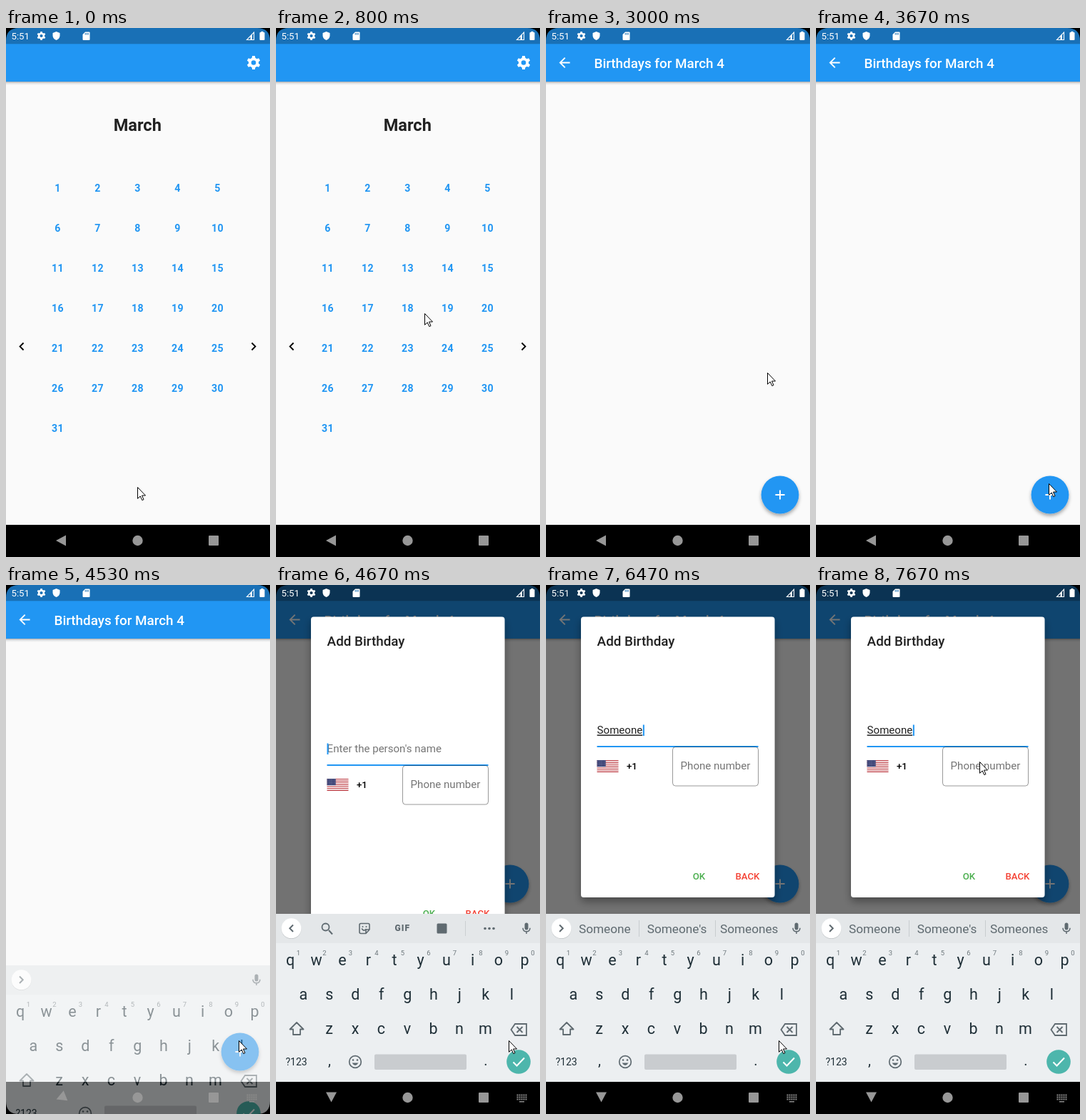
Recreate the animation shown at these times as an HTML page. Size 370 by 740 pixels, loop 8000 ms.

```html
<!DOCTYPE html>
<html lang="en">
<head>
<meta charset="utf-8">
<title>Birthday calendar</title>
<style>
html, body { margin: 0; width: 370px; height: 740px; overflow: hidden; background: #000; }
svg { display: block; font-family: Roboto, sans-serif; }
.mid { text-anchor: middle; }
</style>
</head>
<body>
<svg id="stage" width="370" height="740" viewBox="0 0 370 740" xmlns="http://www.w3.org/2000/svg"></svg>
<script>
const LOOP = 8000, FPS = 15;
const BLUE = '#2196f3', INK = '#1f2f37', GREY = '#5f6a70';

const text = (s, x, y, size, fill, weight = 400, extra = '') =>
  `<text x="${x}" y="${y}" font-size="${size}" fill="${fill}" font-weight="${weight}" ${extra}>${s}</text>`;
const mid = (s, x, y, size, fill, weight, extra = '') =>
  text(s, x, y, size, fill, weight, 'class="mid" ' + extra);
const rect = (x, y, w, h, fill, extra = '') =>
  `<rect x="${x}" y="${y}" width="${w}" height="${h}" fill="${fill}" ${extra}/>`;
const circle = (x, y, r, fill, extra = '') =>
  `<circle cx="${x}" cy="${y}" r="${r}" fill="${fill}" ${extra}/>`;
const path = (d, fill, extra = '') => `<path d="${d}" fill="${fill}" ${extra}/>`;
const line = (d, color, w, extra = '') =>
  path(d, 'none', `stroke="${color}" stroke-width="${w}" ${extra}`);
const group = (id, body, extra = '') => `<g id="${id}" ${extra}>${body}</g>`;
// Icons are drawn on a 24-unit square centred on x, y
const icon = (x, y, size, body) =>
  `<g transform="translate(${x - size / 2} ${y - size / 2}) scale(${size / 24})">${body}</g>`;
const range = n => [...Array(n).keys()];

const gear = circle(12, 12, 5.5, 'none', 'stroke="#fff" stroke-width="4"') +
  range(6).map(i => path('M9.3 6L10 2H14L14.7 6Z', '#fff', `transform="rotate(${i * 60} 12 12)"`)).join('');
const chevron = 'M8.59 16.59L13.17 12 8.59 7.41 10 6l6 6-6 6z';
const chevronLeft = 'M15.41 16.59L10.83 12l4.58-4.59L14 6l-6 6 6 6z';
const plus = 'M19 13h-6v6h-2v-6H5v-2h6V5h2v6h6z';
const arrowBack = 'M20 11H7.83l5.59-5.59L12 4l-8 8 8 8 1.41-1.41L7.83 13H20z';

function calendar() {
  const days = range(31).map(i =>
    mid(i + 1, 72.5 + i % 5 * 56, 229.2 + Math.floor(i / 5) * 56, 14.1, BLUE, 700, 'letter-spacing=".3"'));
  return icon(347, 48.5, 22.6, gear) +
    mid('March', 184.3, 144, 23.55, '#212121', 700) + days.join('') +
    icon(22, 445.5, 22.6, path(chevronLeft, '#000')) +
    icon(347, 445.5, 22.6, path(chevron, '#000'));
}

function dayPage() {
  const fab = circle(328, 653, 26.4, BLUE, 'filter="url(#lift)"') +
    icon(328, 653, 22.6, path(plus, '#fff'));
  return icon(26, 48.5, 22.6, path(arrowBack, '#fff')) +
    text('Birthdays for March 4', 67.5, 55.6, 18.85, '#fff', 500) + group('fab', fab);
}

function flag() {
  const stripes = range(13).map(i =>
    rect(71.5, 245 + i * 17 / 13, 30, 17 / 13, i % 2 ? '#fff' : '#bd3d44')).join('');
  const stars = range(20).map(i =>
    circle(73 + i % 5 * 2.3, 246.3 + Math.floor(i / 5) * 2.1, .45, '#fff')).join('');
  return stripes + rect(71.5, 245, 12.2, 9.15, '#343b70') + stars;
}

function dialog() {
  const field = text("Enter the person's name", 71.6, 208.4, 15.07, '#757575', 400, 'id="hint"') +
    text('', 71.6, 208.4, 15.07, '#212121', 400, 'id="typed" text-decoration="underline"') +
    rect(71.5, 225, 226, 2, BLUE) +
    rect(71.5, 195.5, 2, 15.5, BLUE, 'id="caret"');
  const phone = flag() + text('+1', 113, 258, 13.2, '#000', 500) +
    rect(177.5, 226.5, 120, 54.5, 'none', 'rx="4" stroke="#000" stroke-opacity=".4"') +
    text('Phone number', 188.6, 258, 15.07, '#757575');
  const actions = text('OK', 205.7, 412, 13.2, '#4caf50', 500) + text('BACK', 265.5, 412, 13.2, '#f44336', 500);
  return rect(49, 44.5, 271.5, 392.5, '#fff', 'id="card" rx="4" filter="url(#deep)"') +
    text('Add Birthday', 71.6, 85, 18.85, '#212121', 500) +
    group('field', field + phone) + group('actions', actions);
}

function tools() {
  const round = 'stroke-linecap="round" stroke-linejoin="round"';
  return line('M74 483L79 488.500', GREY, 2) + circle(69.500, 478.500, 5, 'none', `stroke="${GREY}" stroke-width="1.800"`) +
    line('M119 473.500H129Q131 473.500 131 475.500V482L126 487.500H119Q117 487.500 117 485.500V475.500Q117 473.500 119 473.500ZM131 482H126V487.500M120.500 481Q123 485 126 481.500', GREY, 1.6, round) +
    circle(121.5, 478, 1, GREY) + circle(126.5, 478, 1, GREY) +
    mid('GIF', 177.3, 484.4, 12, GREY, 900, 'letter-spacing="1"') +
    rect(225.5, 473.5, 14, 14, GREY, 'rx="1.5"') + rect(265, 470, 1, 21, '#cbcfd1') +
    range(3).map(i => circle(293 + i * 6, 480.500, 1.800, GREY)).join('');
}

function keyboard() {
  const row = (keys, x, y) => [...keys].map((c, i) => mid(c, x + i * 36.5, y, 21.5, INK)).join('');
  const digits = [...'1234567890'].map((c, i) => mid(c, 31.3 + i * 36.5, 517.500, 9.500, '#6d777c')).join('');
  const words = [82.3, 183.6, 284.700].map((x, i) =>
    mid('', x, 487, 17.2, GREY, 400, `id="word${i}"`)).join('');
  const bar = rect(0, 460, 370, 41, '#e4e7e9') + circle(21.5, 481, 14, '#bcc0c3') + circle(21.5, 480.300, 14, '#fff') +
    line('M0 0', GREY, 2, 'id="toggle"') + group('tools', tools()) +
    group('words', words + rect(130, 469, 1, 23, '#c8cccf') + rect(237, 469, 1, 23, '#c8cccf')) +
    icon(351, 480.5, 20, rect(9, 2.5, 6, 12, GREY, 'rx="3"') + line('M6 11Q6 17 12 17T18 11M12 17V21', GREY, 1.8));
  const last = mid('?123', 28.6, 672.3, 14, INK) + mid(',', 75, 672, 20, INK) +
    circle(111, 667, 8.3, 'none', `stroke="${GREY}" stroke-width="1.7"`) +
    circle(108, 664.500, 1.3, GREY) + circle(114, 664.500, 1.3, GREY) + path('M106.500 668.500H115.500Q111 675.500 106.500 668.500', GREY) +
    rect(138, 656.5, 129, 21.5, '#c9cccf', 'rx="2"') + mid('.', 294, 672, 20, INK) +
    circle(340, 667, 16.8, '#4db6ac') + line('M332.5 667.5L337.500 672.500L348 661.500', '#fff', 2);
  const edit = line('M29 612L38.500 621.500H34V629H24V621.500H19.500Z', GREY, 1.8, 'stroke-linejoin="round"') +
    line('M335 614H351V630H335L329.500 622ZM337.500 618L345.500 626M345.500 618L337.500 626', GREY, 1.8);
  return rect(0, 500, 370, 195, '#eceff1') + rect(0, 695, 370, 120, '#eceff1') + bar + digits +
    row('qwertyuiop', 20, 532.300) + row('asdfghjkl', 38.3, 580) + row('zxcvbnm', 74.500, 627.500) + edit + last;
}

const statusBar = text('5:51', 7.5, 16, 13.2, '#fff') + icon(49.5, 11, 14.5, gear) +
  path('M70.5 5L75.500 7V11Q75 15.500 70.500 17Q66 15.500 65.500 11V7Z', '#fff') +
  path('M111 5.500H116.500Q117.500 5.500 117.500 6.500V16Q117.500 17 116.500 17H108.500Q107.500 17 107.500 16V9Z', '#fff') +
  range(3).map(i => rect(110.700 + i * 2, 7, 1, 2.5, '#1970b6')).join('') +
  line('M347.500 6V16.500H337.500Z', '#fff', 1.1) + path('M342.500 11.300L345 8.700V16.500H342.500Z', '#fff') +
  rect(355.5, 6, 7, 11, '#fff', 'rx="1"') + rect(357.500, 4.800, 3, 2, '#fff');

const navIcons = path('M-7.500 0L6.500 -7.500V7.500Z', '#979797', 'id="back"') +
  circle(184.5, 717, 7.2, '#979797') + rect(284, 710, 14, 14, '#979797', 'rx="1"') +
  group('switch', range(15).map(i =>
    rect(337.500 + i % 5 * 3, 712.500 + Math.floor(i / 5) * 3, 2, 2, '#8a8a8a')).join('') + rect(341, 722, 7, 1.5, '#8a8a8a'));

document.getElementById('stage').innerHTML = `
  <defs>
    <linearGradient id="fade" x2="0" y2="1"><stop stop-opacity=".32"/><stop offset=".4" stop-opacity=".1"/><stop offset="1" stop-opacity="0"/></linearGradient>
    <filter id="lift" x="-30%" y="-30%" width="160%" height="170%"><feDropShadow dx="0" dy="3" stdDeviation="2.8" flood-opacity=".35"/></filter>
    <filter id="deep" x="-15%" y="-15%" width="130%" height="130%"><feDropShadow dx="0" dy="6" stdDeviation="6" flood-opacity=".35"/></filter>
    <clipPath id="view"><rect width="370" height="695"/></clipPath>
  </defs>` +
  rect(0, 0, 370, 740, '#fafafa') + rect(0, 75, 370, 5, 'url(#fade)') +
  rect(0, 0, 370, 75, BLUE) + rect(0, 0, 370, 22.3, '#1970b6') +
  group('month', calendar()) + group('day', dayPage()) +
  rect(0, 0, 370, 695, '#000', 'id="scrim"') + statusBar +
  group('dialog', dialog(), 'clip-path="url(#view)"') +
  rect(0, 695, 370, 45, '#000') + group('keys', keyboard()) +
  rect(0, 695, 370, 45, '#000', 'id="navBar"') + navIcons +
  path('M0 0H370V740H0ZM18 0Q0 0 0 18V722Q0 740 18 740H352Q370 740 370 722V18Q370 0 352 0Z', '#000', 'fill-rule="evenodd"') +
  path('M.5 .5V16.300L4.200 12.900L6.800 18.600L9 17.600L6.500 12H11.500Z', '#fff', 'id="mouse" stroke="#000"');

const $ = id => document.getElementById(id);
const set = (id, attrs) => { for (const a in attrs) $(id).setAttribute(a, attrs[a]); };
const show = (id, on) => set(id, { display: on ? 'inline' : 'none' });

// Pointer stops: tick, x, y
const stops = [[2, 184, 642], [15, 217, 330], [24, 236, 232], [39, 236, 232], [45, 310, 482], [52, 326, 617],
  [55, 326, 637], [101, 326, 637], [102, 329, 637], [105, 329, 637], [115, 229, 247]];

const slope = (i, c) => (stops[i + 1][c] - stops[i][c]) / (stops[i + 1][0] - stops[i][0]);
function tangent(i, c) {
  if (i === 0 || i === stops.length - 1) return 0;
  const a = slope(i - 1, c), b = slope(i, c);
  return a * b > 0 ? 2 * a * b / (a + b) : 0;
}
function pointer(k, c) {
  const last = stops[stops.length - 1];
  if (k <= stops[0][0]) return stops[0][c];
  if (k >= last[0]) return last[c];
  const i = stops.findIndex(s => s[0] > k) - 1;
  const p = stops[i], q = stops[i + 1], h = q[0] - p[0], u = (k - p[0]) / h;
  const s = u * u * (3 - 2 * u);
  return p[c] + (q[c] - p[c]) * s + h * (u * (1 - u) ** 2 * tangent(i, c) - u * u * (1 - u) * tangent(i + 1, c));
}

// Typing: tick, entered text, suggestions
const typing = [
  [85, '', 'S So Sorry'], [86, 'S', 'S So Sorry'], [87, 'So', 'So Some Sorry'], [89, 'Som', 'Som Some Someone'],
  [90, 'Some', 'Some Someone Something'], [92, 'Someo', "Someo Someone Someone's"],
  [95, 'Someon', "Someon Someone Someone's"], [97, 'Someone', "Someone Someone's Someones"]];

// Keyboard entry: tick, opacity, drop, turn of the back key
const rise = [[66, .1, 130, 0], [67, .3, 100, -8], [68, .5, 72, -22], [69, .85, 22, -62], [70, 1, 0, -90]];

const at = (list, k) => list.filter(s => s[0] <= k).pop();

function draw(k) {
  show('month', k < 36);
  show('day', k >= 36);

  const kb = at(rise, k), full = k >= 70;
  show('keys', kb);
  show('switch', kb);
  const [, alpha, drop, turn] = kb || [0, 0, 0, 0];
  set('keys', { opacity: alpha, transform: `translate(0 ${drop})` });
  set('navBar', { opacity: kb && !full ? 1 - alpha : 1 });
  show('navBar', !kb || full);
  set('back', { transform: `translate(77.500 ${717 + turn / 90}) rotate(${turn})` });
  set('fab', { transform: `translate(0 ${full ? -235 : 0})` });

  const reveal = full ? 1 : k === 69 ? .5 : 0;
  set('scrim', { opacity: .54 * reveal });
  set('dialog', { opacity: reveal });
  const tall = k < 72 ? 52 : 0;
  set('card', { height: 392.5 + tall });
  set('field', { transform: `translate(0 ${tall / 2})` });
  set('actions', { transform: `translate(0 ${tall})` });

  const entry = at(typing, k);
  const typed = entry ? entry[1] : '';
  show('hint', !typed);
  $('typed').textContent = typed;
  show('caret', !(k >= 76 && k < 80) && !(k >= 104 && k < 112));
  set('caret', { x: typed ? 72.2 + $('typed').getComputedTextLength() : 71.5 });
  show('tools', full && !entry);
  show('words', entry);
  set('toggle', { d: full && !entry ? 'M24 475.500L19.300 480.300L24 485' : 'M19 475.500L23.700 480.300L19 485' });
  if (entry) entry[2].split(' ').forEach((w, i) => {
    const bold = i === 1 && k < 97;
    $('word' + i).textContent = w;
    set('word' + i, { 'font-weight': bold ? 700 : 400, fill: bold ? '#000' : GREY });
  });

  set('mouse', { transform: `translate(${Math.round(pointer(k, 1))} ${Math.round(pointer(k, 2))})` });
}

function tick() {
  const t = performance.now() % LOOP;
  draw(Math.floor((t + 5) * FPS / 1000));
  requestAnimationFrame(tick);
}
tick();
</script>
</body>
</html>
```
